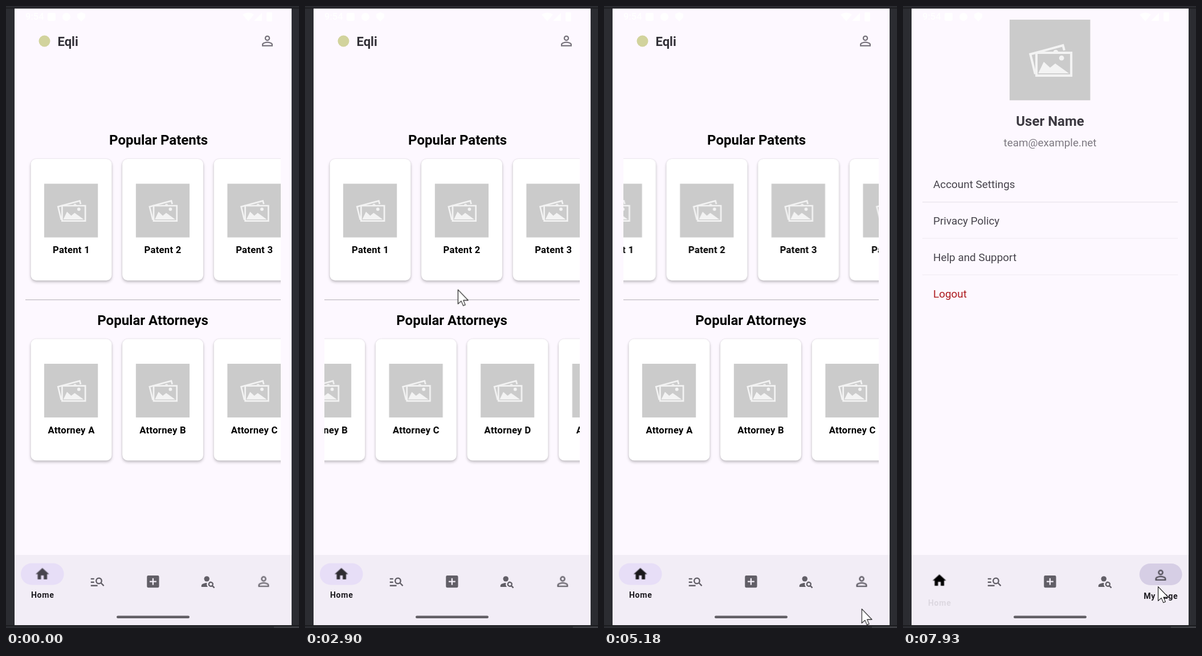
An HTML page that plays this animation: 514 px wide and 1090 px high, repeating every 8000 ms.

```html
<!DOCTYPE html>
<html lang="en">
<head>
<meta charset="utf-8">
<title>Patent app walkthrough</title>
<style>
html, body { margin: 0; width: 100%; height: 100%; overflow: hidden; background: #2b2c31; }
#stage { display: block; width: 514px; height: 1090px; font-family: Roboto, "Open Sans", sans-serif; }
.mid { text-anchor: middle; }
.title { font-size: 24px; font-weight: 700; }
.name { font-size: 16.6px; font-weight: 700; letter-spacing: .3px; text-anchor: middle; }
.item { font-size: 18.9px; fill: #46434b; }
.label { font-size: 14.2px; font-weight: 700; letter-spacing: .65px; text-anchor: middle; fill: #1d1b20; }
.card { fill: #fff; filter: drop-shadow(0 3px 2.5px rgba(0,0,0,.2)) drop-shadow(0 0 1px rgba(0,0,0,.14)); }
.icon { fill: currentColor; color: #625f67; }
.icon.on { color: #48454e; }

.anim { animation: 8s linear infinite; }
#homePage { animation-name: hide; }
#myPage { animation-name: show; }
#patents { animation-name: patents; }
#attorneys { animation-name: attorneys; }
#cursor { animation-name: cursor; }
#homePill { animation-name: pillOut; }
#myPill { animation-name: pillIn; transform-box: fill-box; transform-origin: center; }
#homeIcon { --dy: 13px; animation-name: shift; }
#myIcon { --dy: -13px; --tone: #48454e; animation-name: shift; }
#homeLabel { animation-name: labelOut; }
#myLabel { animation-name: labelIn; }

@keyframes hide { 0%, 98.1% { visibility: visible; } 98.101%, 100% { visibility: hidden; } }
@keyframes show { 0%, 98.1% { visibility: hidden; } 98.101%, 100% { visibility: visible; } }

@keyframes patents {
  0%, 38.75% { transform: translateX(0); }
  43.25%, 45% { transform: translateX(-328px); }
  48.75%, 100% { transform: translateX(-94.6px); }
}
@keyframes attorneys {
  0%, 28.125% { transform: translateX(0); }
  32% { transform: translateX(-215px); animation-timing-function: ease-out; }
  36.25% { transform: translateX(-240.8px); animation-timing-function: ease-out; }
  41.25%, 56% { transform: translateX(-244.4px); }
  59.5%, 100% { transform: translateX(0); }
}

@keyframes pillOut { 0%, 98.1% { opacity: 1; } 98.8%, 100% { opacity: 0; } }
@keyframes pillIn {
  0%, 98.1% { opacity: 0; transform: scaleX(.1); }
  98.9%, 100% { opacity: 1; transform: scaleX(1); }
}
@keyframes shift {
  0%, 98.1% { transform: translateY(0); }
  99.3%, 100% { transform: translateY(var(--dy)); color: var(--tone); }
}
@keyframes labelOut {
  0%, 98.1% { transform: translateY(0); opacity: 1; }
  99.25%, 100% { transform: translateY(16px); opacity: 0; }
}
@keyframes labelIn {
  0%, 98.1% { transform: translateY(14px); opacity: 0; }
  99%, 100% { opacity: 1; }
  99.3%, 100% { transform: translateY(0); }
}

@keyframes cursor {
  0%, 2.25% { transform: translate(516px, 246px); }
  5% { transform: translate(440px, 480px); }
  7.75% { transform: translate(360px, 860px); }
  9.5% { transform: translate(300px, 1058px); }
  12% { transform: translate(220px, 1045px); }
  15% { transform: translate(150px, 1015px); }
  18.125% { transform: translate(112px, 970px); }
  22.5% { transform: translate(127px, 916px); }
  25% { transform: translate(300px, 800px); }
  27.875% { transform: translate(400px, 715px); }
  32% { transform: translate(185px, 705px); }
  33.75% { transform: translate(210px, 620px); }
  36.25% { transform: translate(267px, 497px); }
  38.625% { transform: translate(410px, 420px); }
  43.25% { transform: translate(81px, 451px); }
  44.875% { transform: translate(95px, 440px); }
  48.75% { transform: translate(328px, 425px); }
  50.25% { transform: translate(472px, 560px); }
  51.875% { transform: translate(330px, 740px); }
  53.375% { transform: translate(190px, 808px); }
  54.25% { transform: translate(188px, 796px); }
  55.875% { transform: translate(195px, 710px); }
  59.5% { transform: translate(440px, 700px); }
  61% { transform: translate(482px, 800px); }
  63.875% { transform: translate(440px, 1045px); }
  65.25% { transform: translate(458px, 1062px); }
  67.5% { transform: translate(280px, 830px); }
  69.25% { transform: translate(120px, 590px); }
  70.25% { transform: translate(75px, 640px); }
  72% { transform: translate(210px, 900px); }
  73.5%, 74.375% { transform: translate(339px, 1010px); }
  78.125% { transform: translate(241px, 1006px); }
  80.375%, 81.375% { transform: translate(245px, 1001px); }
  82.875%, 85.5% { transform: translate(270px, 1015px); }
  88%, 88.875% { transform: translate(402px, 1012px); }
  93.125%, 100% { transform: translate(447px, 1017px); }
}
</style>
</head>
<body>
<svg id="stage" viewBox="0 0 514 1090">
  <defs>
    <symbol id="photo" viewBox="0 0 94.5 94.5">
      <path fill="#cbcbcb" d="M0 0h94.5v94.5H0z"/>
      <g fill="none" stroke="#f3f3f3" stroke-width="2.7">
        <path d="M30 63.6 24.3 40.5 62.4 30.2 64 36"/>
        <path d="M31.4 38.8h40.7v26.6H31.4z"/>
      </g>
      <g fill="#f3f3f3">
        <path d="M51.2 37.5a2.9 2.9 0 0 1 5.6 0z"/>
        <circle cx="60.8" cy="44.9" r="2.9"/>
        <path d="M33.5 62.8 40 49.4 47.4 56.2 53.4 51.4 69.4 62.8z"/>
      </g>
    </symbol>
    <symbol id="person" viewBox="0 0 24 24">
      <path d="M12 5.9a2.1 2.1 0 1 1 0 4.2 2.1 2.1 0 0 1 0-4.2m0 9c2.97 0 6.1 1.46 6.1 2.1v1.1H5.9V17c0-.64 3.13-2.1 6.1-2.1M12 4a4 4 0 1 0 0 8 4 4 0 0 0 0-8zm0 9c-2.67 0-8 1.34-8 4v3h16v-3c0-2.66-5.33-4-8-4z"/>
    </symbol>
    <symbol id="home" viewBox="0 0 24 24"><path d="M10 20v-6h4v6h5v-8h3L12 3 2 12h3v8z"/></symbol>
    <symbol id="search" viewBox="0 0 24 24">
      <path d="M7 9H2V7h5zM7 12H2v2h5zM2 19h10v-2H2zM20.59 19l-3.83-3.83A5 5 0 1 1 18.17 13.75L22 17.59zM17 11a3 3 0 1 0-6 0 3 3 0 0 0 6 0z"/>
    </symbol>
    <symbol id="add" viewBox="0 0 24 24">
      <path d="M19 3H5a2 2 0 0 0-2 2v14a2 2 0 0 0 2 2h14a2 2 0 0 0 2-2V5a2 2 0 0 0-2-2zm-2 10h-4v4h-2v-4H7v-2h4V7h2v4h4z"/>
    </symbol>
    <symbol id="lookup" viewBox="0 0 24 24">
      <circle cx="10" cy="8" r="4"/>
      <path d="M10.35 14.01C7.62 13.91 2 15.27 2 18v2h9.54c-2.47-2.76-1.23-5.89-1.19-5.99zM19.43 18.02A4 4 0 1 0 18.02 19.43L20.59 22 22 20.59zM16 18a2 2 0 1 1 0-4 2 2 0 0 1 0 4z"/>
    </symbol>
  </defs>

  <!-- device frame -->
  <path fill="#2b2c31" d="M0 0h514v1090H0z"/>
  <path fill="#1c1d20" d="M0 2.5h514v2H0zM0 1085h514v2H0z"/>
  <path fill="#55565b" d="M470 1088h44v1h-44z"/>
  <path fill="#fdf8ff" d="M15 4.5h486V1085H15z"/>

  <!-- status bar -->
  <g fill="#fff">
    <text x="34" y="24" font-size="16.5" font-weight="500">9:54</text>
    <rect x="73" y="12" width="14" height="14" rx="3"/>
    <circle cx="106" cy="19" r="7"/>
    <path d="M125 14l7-3 7 3v6l-7 7-7-7z"/>
    <path d="M415 15q10-7 20 0l-10 12zM449 12v14h-14z"/>
    <rect x="457" y="11" width="10" height="16" rx="2"/>
  </g>

  <g id="homePage" class="anim">
    <circle cx="67.5" cy="61.5" r="10" fill="#d2d39d"/>
    <text x="90.5" y="69.7" font-size="22" font-weight="700" fill="#323037">Eqli</text>
    <use href="#person" class="icon" style="color:#77737c" x="444.3" y="47" width="28.4" height="28.4"/>
    <text class="title mid" x="267.6" y="243">Popular Patents</text>
    <svg x="34" y="258" width="448" height="240"><g id="patents" class="anim"></g></svg>
    <path fill="#c9c5cb" d="M34 514h448v1.5H34z"/>
    <text class="title mid" x="257.6" y="558.5">Popular Attorneys</text>
    <svg x="34" y="573.6" width="448" height="240"><g id="attorneys" class="anim"></g></svg>
  </g>

  <g id="myPage" class="anim">
    <use href="#photo" x="187" y="23.8" width="141.7" height="141.7"/>
    <text class="title mid" x="258" y="210" fill="#3c3941">User Name</text>
    <text class="mid" x="258" y="246" font-size="18.9" fill="#7d7981">team@example.net</text>
    <text class="item" x="53" y="319">Account Settings</text>
    <text class="item" x="53" y="383">Privacy Policy</text>
    <text class="item" x="53" y="446.5">Help and Support</text>
    <text class="item" x="53" y="510.5" style="fill:#ad1a1d">Logout</text>
    <path fill="#e8e3ea" d="M34 343h448v1.2H34z"/>
    <path fill="#f2edf4" d="M34 406.5h448v1.2H34zM34 470.5h448v1.2H34z"/>
  </g>

  <!-- bottom navigation -->
  <path fill="#f2edf6" d="M15 962h486v123H15z"/>
  <rect id="homePill" class="anim" x="26" y="976.5" width="75.6" height="38" rx="19" fill="#e7def7"/>
  <rect id="myPill" class="anim" x="414.8" y="977" width="74.8" height="38" rx="19" fill="#d6cee5"/>
  <use href="#home" id="homeIcon" class="icon on anim" x="49.6" y="981.3" width="28.4" height="28.4"/>
  <use href="#search" class="icon" x="146.4" y="994.4" width="28.4" height="28.4"/>
  <use href="#add" class="icon" x="243.7" y="994.4" width="28.4" height="28.4"/>
  <use href="#lookup" class="icon" x="340.4" y="994.4" width="28.4" height="28.4"/>
  <use href="#person" id="myIcon" class="icon anim" x="437.8" y="994.4" width="28.4" height="28.4"/>
  <text id="homeLabel" class="label anim" x="64.2" y="1037">Home</text>
  <text id="myLabel" class="label anim" x="452.2" y="1037">My Page</text>
  <rect x="194" y="1068.5" width="128" height="4.6" rx="2.3" fill="#625f65"/>

  <path id="cursor" class="anim" fill="#fff" stroke="#111" stroke-width="1.1" stroke-linejoin="round"
    d="M.6.6V25.4L6.2 20.4 9.8 28.6 13.4 27.1 10 19.1H18.4z"/>
</svg>
<script>
const card = (text, i) => `
  <g transform="translate(${9.5 + 160.6 * i} 10)">
    <rect class="card" width="142" height="213" rx="9.5"/>
    <use href="#photo" x="23.5" y="43.2" width="94.5" height="94.5"/>
    <text class="name" x="71" y="165">${text}</text>
  </g>`;

const fill = (id, word, marks) => {
  document.getElementById(id).innerHTML =
    [...marks].map((mark, i) => card(`${word} ${mark}`, i)).join('');
};

fill('patents', 'Patent', '12345');
fill('attorneys', 'Attorney', 'ABCDE');
</script>
</body>
</html>
```
